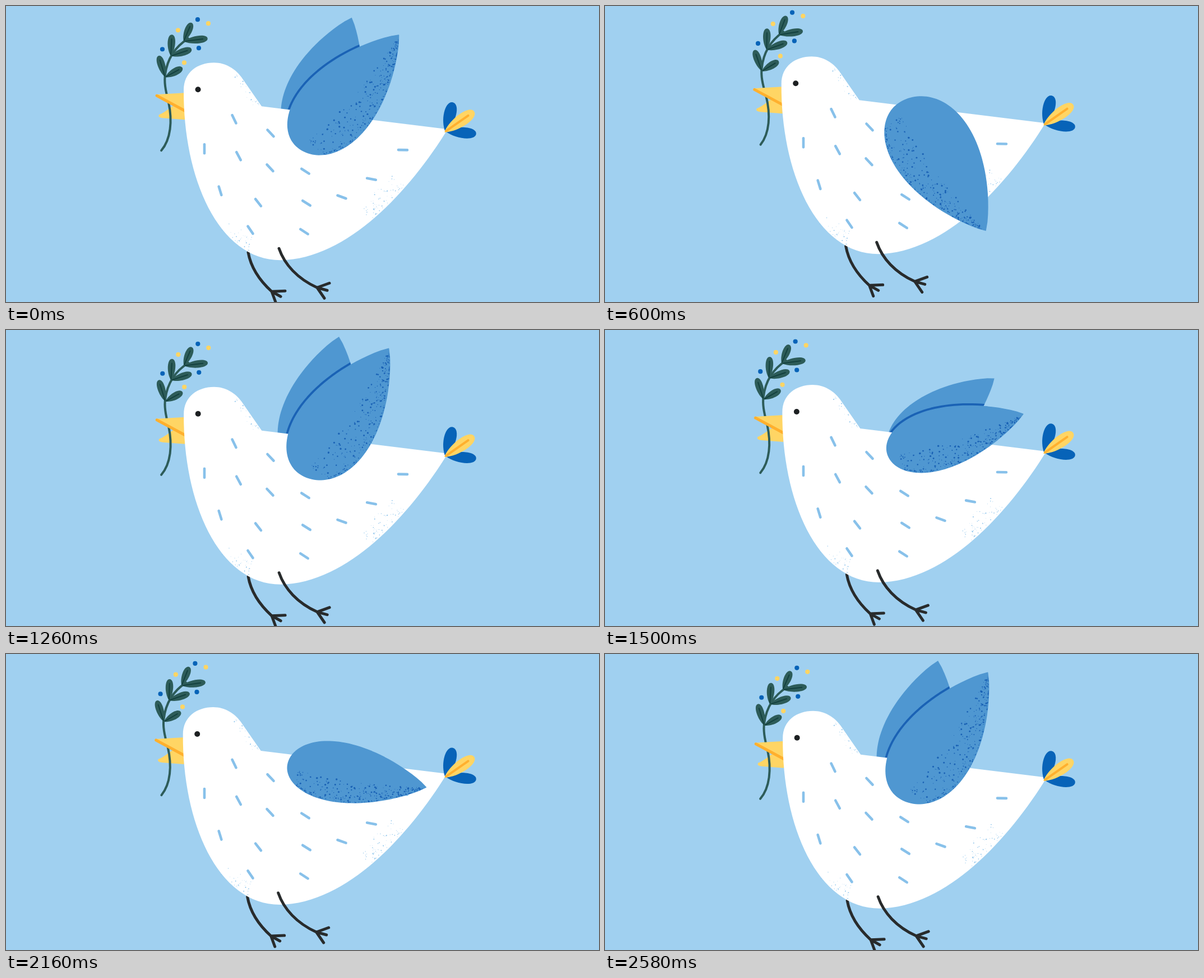
Animation of 1058 by 529 pixels, one loop 2640 ms. Source, as an HTML page with a canvas:

```html
<!DOCTYPE html>
<html lang="en">
<head>
<meta charset="utf-8">
<title>Flying dove</title>
<style>
  html, body { margin: 0; width: 100%; height: 100%; overflow: hidden; background: #a0d0f0; }
  canvas { display: block; }
</style>
</head>
<body>
<canvas id="stage" width="1058" height="529"></canvas>
<script>
const ctx = document.getElementById('stage').getContext('2d');
const STEP = 60, BEAT = 22, RAD = Math.PI / 180, FAN = 24 * RAD;
const SKY = '#a0d0f0', WING = '#4f97d1', NAVY = '#1a62b5', BLUE = '#0763b8', YELLOW = '#ffd564',
      ORANGE = '#ffb02e', GREEN = '#2d5c59', DARK = '#123f3d', INK = '#282b2c', DASH = '#88c1ea';

let seed = 7;
const rnd = () => (seed = seed * 16807 % 2147483647) / 2147483647;
const times = (n, make) => Array.from({ length: n }, make);

// Half width of a wing along its length: round root, pointed tip.
const profile = t => 2.49 * Math.sqrt(t) * (1 - t) ** .9;
const wingDots = times(320, () => [.08 + .9 * rnd(), .8 * rnd() ** 2, .5 + 1.2 * rnd() ** 2]);

// Speckles scattered inward from an edge line.
const speckle = (n, x, y, dx, dy, inX, inY) => times(n, () => {
  const t = rnd(), d = rnd() ** 1.7;
  return [x + dx * t + inX * d, y + dy * t + inY * d, .4 + .6 * rnd() ** 2];
});
const bodyDots = [
  ...speckle(65, 712, 320, -60, 61, -24, -18),
  ...speckle(32, 384, 400, 50, 38, 14, -18),
  ...speckle(24, 414, 122, 38, 54, -12, 4)
];

const body = new Path2D('M456 179L788 220C720 330 610 452 490 454C378 454 316 305 317 150' +
  'C317 118 342 101 371 101C392 101 409 112 420 127Z');
const feathers = [[354, 255], [382, 330], [436, 400], [407, 202], [415, 268], [450, 351], [472, 227],
  [471, 289], [532, 403], [534, 295], [536, 352], [599, 341], [652, 309], [708, 257]];

const path = d => d instanceof Path2D ? d : new Path2D(d);
function line(d, color, width) {
  ctx.strokeStyle = color;
  ctx.lineWidth = width;
  ctx.stroke(path(d));
}
function fill(d, color) {
  ctx.fillStyle = color;
  ctx.fill(path(d));
}
function dot(x, y, r, color) {
  ctx.fillStyle = color;
  ctx.beginPath();
  ctx.arc(x, y, r, 0, 7);
  ctx.fill();
}
function placed(x, y, angle, paint) {
  ctx.save();
  ctx.translate(x, y);
  ctx.rotate(angle);
  paint();
  ctx.restore();
}
function clipped(d, paint) {
  ctx.save();
  ctx.clip(d);
  paint();
  ctx.restore();
}

function leaf(x, y, degrees, l, w, color, rib, ribWidth) {
  placed(x, y, degrees * RAD, () => {
    fill(`M0 0C${l * .35} ${-w} ${l} ${-w} ${l} 0C${l} ${w} ${l * .35} ${w} 0 0`, color);
    if (rib) line(`M${l * .06} 0H${l * .8}`, rib, ribWidth);
  });
}

function twig() {
  line('M-13 78C4 58 7 25 0 -8C-6 -32 -8 -45 -6 -58C-3 -80 8 -105 35 -122', GREEN, 4);
  [[-6, -53], [4, -91], [27, -117]].forEach(([x, y], i) => {
    leaf(x, y, -107 + 20 * i, 40 - 2 * i, 9, GREEN, DARK, 1.8);
    leaf(x, y, -29 + 11 * i, 35 + 4 * i, 9, GREEN, DARK, 1.8);
  });
  [[52, -156], [17, -137], [-11, -103], [71, -149], [54, -105], [28, -79]].forEach(([x, y], i) =>
    dot(x, y, 4.1, i % 2 ? YELLOW : BLUE));
}

// Wing outline around its shoulder, with a point function for the speckles.
function makeWing(x, y, angle, length, lead, trail) {
  const c = Math.cos(angle), s = Math.sin(angle);
  const at = (t, side) => {
    const u = length * t - 50, v = side * profile(t) * (side < 0 ? lead : trail);
    return [x + u * c - v * s, y + u * s + v * c];
  };
  const shape = new Path2D();
  for (let q = -50; q < 50; q++) shape.lineTo(...at((q / 50) ** 2, Math.sign(q)));
  shape.closePath();
  return { at, shape };
}

function draw(n) {
  const u = 2 * Math.PI * (n - 7) / BEAT;
  const phase = u + 2.37 - .16 * Math.cos(u) - .17 * Math.cos(2 * u);
  const angle = .97 * Math.cos(phase), lift = Math.sin(angle), reach = lift * lift;
  const bob = 7 * lift - 4.9, sway = 1.5 * (lift - .7), tail = 8.5 * lift - 2.5 - 2 * Math.sin(phase);

  // The far wing fans out from behind the near one as the wings rise.
  const f = Math.min(1, Math.max(0, (lift + .2) * 2)), fan = f * f * (3 - 2 * f);
  const length = 249 + 38 * reach, lead = 53 + 28 * reach - 8 * lift, trail = 51 + 30 * reach + 4 * lift;
  const y = 206 + 14 * reach;
  const near = makeWing(552, y, -angle, length, lead, trail);
  const far = makeWing(552, y, -angle - FAN * fan, length * .94, lead * (.85 + .3 * fan), trail * .9);

  ctx.lineCap = ctx.lineJoin = 'round';
  ctx.fillStyle = SKY;
  ctx.fillRect(0, 0, 1058, 529);

  fill(far.shape, WING);
  clipped(far.shape, () => line(near.shape, NAVY, 9));

  placed(sway, bob, 0, () => {
    line('M432 440C437 468 452 490 474 510L498 509M474 510L490 519M474 510L481 529', INK, 5);
    fill('M273 194C286 189 294 179 300 178L319 188V203L280 200Q270 199 273 194', YELLOW);
    placed(290, 180, (1.3 * lift - 1) * RAD, twig);
    fill('M267 158L319 155V190Z', YELLOW);
    line('M269 160L319 187', ORANGE, 5);
    fill(body, '#fff');
    for (const d of bodyDots) dot(...d, DASH);
    dot(342.5, 149, 5, '#1d2022');
    line('M487 433C497 462 520 487 555 503L577 495M555 503L573 508M555 503L568 522', INK, 5);
  });

  // Feather marks turn from upright at the breast to level at the tail.
  for (const [x, y] of feathers) {
    const lean = Math.PI / 2 * (1 - ((x - 354) / 360) ** .65);
    placed(x, y + bob, lean, () => line('M-8 0H8', DASH, 4.6));
  }

  placed(0, tail, 0, () => {
    leaf(784, 223, -76, 55, 14.5, BLUE);
    leaf(784, 221, 5, 55, 13, BLUE);
    leaf(782, 223, -35, 65, 14.5, YELLOW, ORANGE, 4);
  });

  fill(near.shape, WING);
  line(near.shape, WING, 1.5);
  clipped(near.shape, () => {
    for (const [t, inset, r] of wingDots) dot(...near.at(t, 1 - inset), r, NAVY);
  });
}

function tick() {
  draw(Math.floor(performance.now() / STEP) % BEAT);
  requestAnimationFrame(tick);
}
tick();
</script>
</body>
</html>
```
